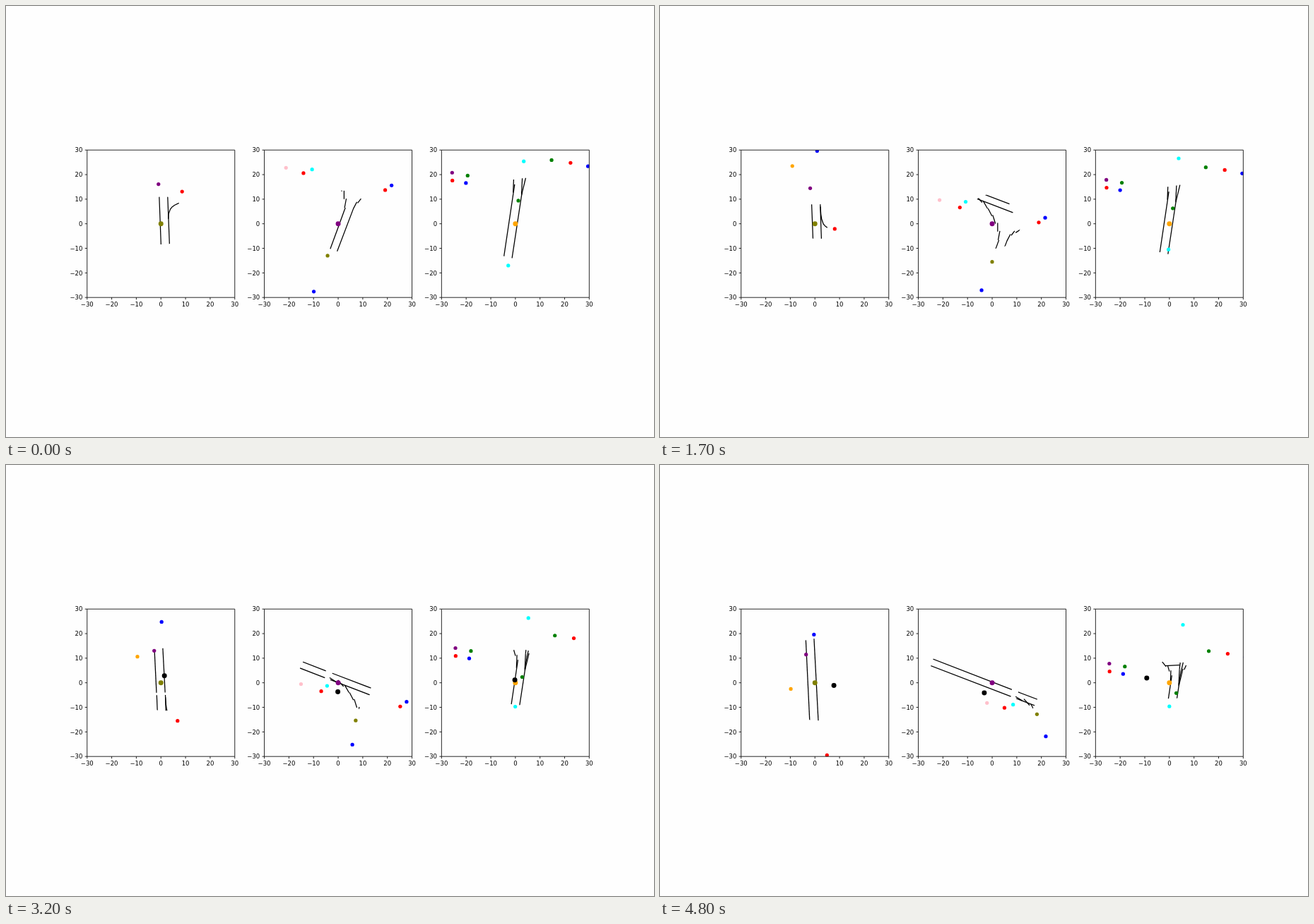
These frames come from a looping animation (917 px wide and 611 px high, 4.9 s). An HTML page:

```html
<!DOCTYPE html>
<html>
<head>
<meta charset="utf-8">
<style>
html, body { margin: 0; width: 100%; height: 100%; overflow: hidden; background: #fefefe; }
svg { display: block; }
text { font: 8.5px "DejaVu Sans", sans-serif; }
.axes { fill: none; stroke: #000; stroke-width: .85; }
.roads { fill: none; stroke: #000; stroke-width: .365; stroke-linejoin: round; }
</style>
</head>
<body>
<svg id="stage" width="917" height="611" viewBox="0 0 917 611"></svg>
<script>
const SIZE = 209, TOP = 204.2, STEP = 250.8, LEFT = 114.75;
const LAST = 48, RIVAL_FROM = 20;
const KEYS = [0, 6, 12, 22, 28, 37, 48];

const at = (x, y) => () => [x, y];

// All positions are in axis units; u runs from 0 to 1 over the loop.
// dx, dy: how the map slides past the centred car.  sight: radius in which roads show, around eye(u).
// roads: [first frame, x, y, ...] on the map.  onMap, nearCar: [colour, u => position].
// rival: the black dot, over its own 0 to 1.
const panels = [
  {
    centre: 'olive',
    dx: [0, -.1, -.1, -.3, -.5, -.6, -.8],
    dy: [0, -5.8, -11.1, -18.9, -24.4, -32.1, -41],
    sight: [9.8, 7, 7.2, 8.3, 10.5, 15.2, 16.7],
    eye: at(1, 1.3),
    roads: [
      [0, .05, -9, -.8, 14, -1.15, 22.85],
      [0, -1.25, 23.8, -3, 60.5],
      [0, 3.5, -9, 2.7, 12, 2.35, 22.9],
      [0, 2.25, 23.9, .35, 60.5],
      [0, 3, 2, 3.1, 4, 3.8, 5.9, 4.6, 6.9, 5.6, 7.6, 7.3, 8.4],
      [8, 2.4, 22, 2.6, 18.9, 2.9, 17, 3.6, 14.9, 4.2, 14.2, 5.2, 13.4]
    ],
    onMap: [
      ['orange', at(-9, 38.5)],
      ['red', u => [8.6 - 2.9 * u * u, 13.1 - 1.6 * u * u]]
    ],
    nearCar: [
      ['purple', u => [-1 - 2.6 * u, 16.1 - 4.6 * u]],
      ['blue', u => [1.6 - 2 * u, 35.1 - 15.5 * u]]
    ],
    rival: w => [7.7 * w * w, .8 - 1.6 * w + 26.6 * w * w - 26.9 * w ** 3]
  },
  {
    centre: 'purple',
    dx: [0, -.8, -.9, 1, 3.7, 9.6, 19.1],
    dy: [0, -4.7, -9.5, -16.7, -20.9, -26.1, -31],
    sight: [12.6, 14.2, 11.8, 11.4, 13.8, 17, 22.7],
    eye: u => [2.5 - 5.5 * u, 1],
    roads: [
      [0, -4.3, -13.2, .25, -.8],
      [0, .6, .2, 2.9, 6.5],
      [0, -1.2, -13.3, 6.2, 6.2, 7.6, 8.9],
      [0, 7.2, 21.2, -8.5, 27.2],
      [0, -11.1, 28.2, -45, 41.4],
      [8, 8.6, 17.7, -9.3, 24.6],
      [0, -11.5, 25.4, -45, 38.3],
      [0, 2.4, 13.5, 2.4, 10],
      [0, 3.3, 10.2, 2.6, 6.5],
      [0, .4, 16.7, 1.5, 13.2],
      [0, -1.5, 19.4, .1, 16.3],
      [0, -3.4, 22.3, -1.7, 19.3],
      [0, -6.2, 24.4, -3.9, 21.8],
      [0, -9.6, 25.4, -6.9, 23.7],
      [0, 7.9, 8.4, 9.3, 10.2],
      [3, 9.7, 9.5, 11.7, 10.8],
      [3, 12, 9.6, 14.6, 9.8]
    ],
    onMap: [
      ['pink', at(-21.2, 22.8)],
      ['cyan', at(-10.6, 22.1)],
      ['red', at(19.1, 13.7)],
      ['blue', at(21.7, 15.6)],
      ['green', at(31.2, 11.3)],
      ['red', u => [-14.1 + 5 * u - 5 * u * u, 20.6 - 3.6 * u + 3.8 * u * u]]
    ],
    nearCar: [
      ['olive', u => [-4.3 + 6.4 * u + 16.1 * u * u, -13 - 11 * u + 11.2 * u * u]],
      ['blue', u => [-9.9 + 7.1 * u + 24.6 * u * u, -27.6 - .8 * u + 6.6 * u * u]]
    ],
    rival: w => [.2 + 1.2 * w - 4.6 * w * w, .2 - 12.6 * w + 8.3 * w * w]
  },
  {
    centre: 'orange',
    dx: [0, 0, -.2, .5, 1.1, 1.5, 1.3],
    dy: [0, -1.9, -2.2, -3.8, -5.2, -8.7, -13],
    sight: [16.6, 14.3, 14.2, 15, 12.4, 10.7, 9],
    eye: at(1, 2.4),
    roads: [
      [0, -.3, 16, -5, -15.6],
      [0, 2.7, 12.8, -1.7, -16.2],
      [0, -.7, 18, -.9, 12.7],
      [0, 2.8, 18.5, 2.5, 12.2],
      [0, 4.2, 18.7, 3.6, 16.2, 2.5, 11.7],
      [24, 3.1, 21.2, 2.8, 18.5],
      [25, -2, 20, -1.3, 17.6],
      [32, 4.3, 21.3, 3.3, 17, 2.5, 12.2],
      [33, -4.2, 21.5, -2.7, 19.6],
      [41, 5.5, 20.1, 4.7, 18.3],
      [43, -3, 19.9, 2.8, 20.2]
    ],
    onMap: [
      ['purple', at(-25.7, 20.8)],
      ['red', at(-25.6, 17.6)],
      ['green', at(-19.4, 19.6)],
      ['blue', at(-20.1, 16.6)],
      ['green', at(14.7, 25.9)],
      ['red', at(22.4, 24.8)],
      ['blue', at(29.5, 23.4)],
      ['green', u => [1.2 + .3 * u, 9.4 - .6 * u]],
      ['cyan', u => [3.4 + .8 * u, 25.4 + 11.9 * u - .7 * u * u]]
    ],
    nearCar: [
      ['cyan', u => [-2.9 * Math.exp(-6 * u), -9.6 - 7.4 * Math.exp(-6 * u)]]
    ],
    rival: w => [.3 + 5 * w - 14.5 * w * w, -.9 + 6.3 * w - 3.5 * w * w]
  }
];

const stage = document.getElementById('stage');

function set(node, attrs) {
  for (const name in attrs) node.setAttribute(name, attrs[name]);
}

function add(parent, tag, attrs = {}, text = '') {
  const node = document.createElementNS('http://www.w3.org/2000/svg', tag);
  set(node, attrs);
  node.textContent = text;
  return parent.appendChild(node);
}

// Smooth curve through one value per key.
function sample(values, frame) {
  const end = KEYS.length - 1;
  const slope = i => {
    const a = Math.max(i - 1, 0), b = Math.min(i + 1, end);
    return (values[b] - values[a]) / (KEYS[b] - KEYS[a]);
  };
  let i = 0;
  while (i < end - 1 && frame >= KEYS[i + 1]) i++;
  const span = KEYS[i + 1] - KEYS[i], u = (frame - KEYS[i]) / span, v = 1 - u;
  return v * v * (1 + 2 * u) * values[i] + u * u * (1 + 2 * v) * values[i + 1]
    + u * v * span * (v * slope(i) - u * slope(i + 1));
}

function drawAxes(left) {
  const bottom = TOP + SIZE;
  let d = `M${left} ${TOP}h${SIZE}v${SIZE}h${-SIZE}z`;
  for (let n = -30; n <= 30; n += 10) {
    const along = (n + 30) * SIZE / 60, x = left + along, y = bottom - along;
    const label = String(n).replace('-', '\u2212');
    d += `M${x} ${bottom}v3M${left} ${y}h-3`;
    add(stage, 'text', { x, y: bottom + 12.5, 'text-anchor': 'middle' }, label);
    add(stage, 'text', { x: left - 6.3, y: y + 3.2, 'text-anchor': 'end' }, label);
  }
  add(stage, 'path', { class: 'axes', d });
}

function build(panel, index) {
  const left = LEFT + index * STEP, id = 'sight' + index;
  const view = add(stage, 'svg', { x: left, y: TOP, width: SIZE, height: SIZE, viewBox: '-30 -30 60 60' });
  const world = add(view, 'g', { transform: 'scale(1 -1)' });
  panel.lens = add(add(world, 'clipPath', { id }), 'circle');

  const roads = add(add(world, 'g', { 'clip-path': `url(#${id})` }), 'g', { class: 'roads' });
  panel.paths = panel.roads.map(([, ...points]) => add(roads, 'polyline', { points }));

  const map = add(world, 'g');
  panel.sliding = [roads, map];
  const dot = (parent, fill, r) => add(parent, 'circle', { fill, r });
  const dots = (parent, list) => list.map(([colour, where]) => ({ node: dot(parent, colour, .75), where }));
  dot(world, panel.centre, 1);
  panel.dots = [...dots(map, panel.onMap), ...dots(world, panel.nearCar)];
  panel.black = dot(world, 'black', 1);
  drawAxes(left);
}

function place(node, [cx, cy]) {
  set(node, { cx, cy });
}

function show(node, visible) {
  node.style.display = visible ? '' : 'none';
}

function draw(panel, frame) {
  const u = frame / LAST;
  const transform = `translate(${sample(panel.dx, frame)} ${sample(panel.dy, frame)})`;
  panel.sliding.forEach(group => set(group, { transform }));
  place(panel.lens, panel.eye(u));
  set(panel.lens, { r: sample(panel.sight, frame) });
  panel.paths.forEach((path, i) => show(path, frame >= panel.roads[i][0]));
  panel.dots.forEach(({ node, where }) => place(node, where(u)));
  place(panel.black, panel.rival((frame - RIVAL_FROM) / (LAST - RIVAL_FROM)));
  show(panel.black, frame >= RIVAL_FROM);
}

let shown = -1;
const start = performance.now();
function tick() {
  const frame = Math.floor((performance.now() - start) % 4900 / 100);
  if (frame !== shown) panels.forEach(panel => draw(panel, frame));
  shown = frame;
  requestAnimationFrame(tick);
}

panels.forEach(build);
tick();
</script>
</body>
</html>
```
